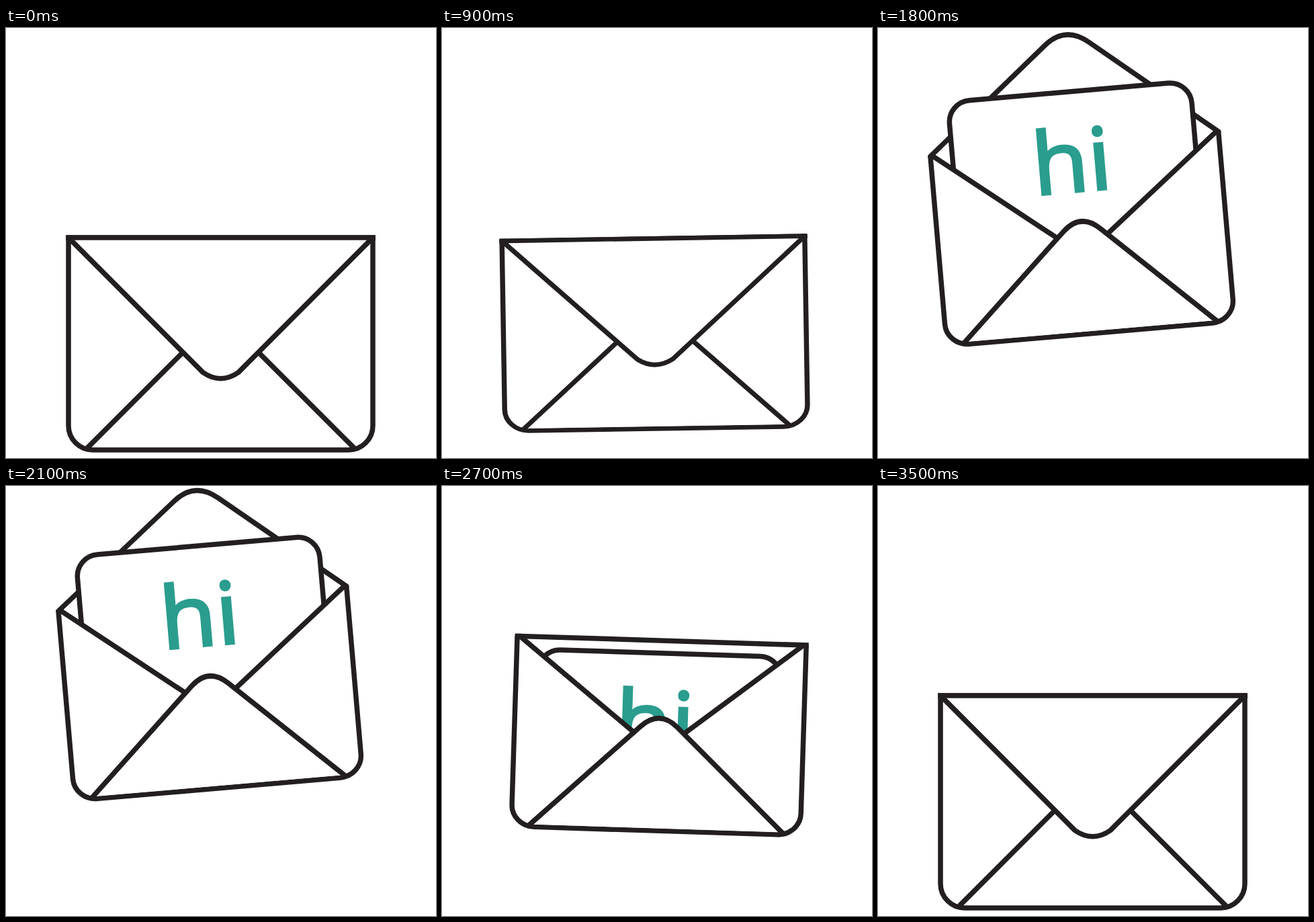
Animation of 640 by 640 pixels, one loop 4.4 s. Source, as an HTML page:

```html
<!DOCTYPE html>
<html lang="en">
<head>
<meta charset="utf-8">
<title>Envelope</title>
<style>
  html, body { margin: 0; width: 100%; height: 100%; overflow: hidden; background: #fff; }
  svg { display: block; width: 100vw; height: 100vh; }
  .ink { fill: #fff; stroke: #231f20; stroke-width: 7.5; stroke-linejoin: round; }
  .open .ink { vector-effect: non-scaling-stroke; }
  .round { stroke-linecap: round; }
  .word { font: 400 143px "Open Sans", "Noto Sans", sans-serif; fill: #2a9d8f; stroke: #2a9d8f; stroke-width: 4; }
  .spark { stroke: #000; stroke-width: 7; }
</style>
</head>
<body>
<svg viewBox="0 0 640 640">
  <g id="envelope">
    <path id="openFlap" class="ink round"/>
    <path id="rim" class="ink" d="M89.25 312H549.75"/>
    <g id="letter">
      <rect class="ink" x="127.3" y="312" width="381" height="250" rx="34" ry="36"/>
      <text class="word" x="251 338.5" y="478.5">hi</text>
    </g>
    <path class="ink" d="M93 314L97 312L285 469.5H354L542 312L546 314V592A36 36 0 0 1 510 628H129A36 36 0 0 1 93 592Z"/>
    <path class="ink round" d="M122 624L291 455Q319.5 427 348 455L517 624"/>
    <g id="front">
      <path id="shutFlap" class="ink round"/>
      <path class="ink" d="M89.25 312H549.75"/>
    </g>
  </g>
  <line id="sparkL" class="spark"/>
  <line id="sparkR" class="spark"/>
</svg>
<script>
const LOOP = 4400, STEP = 100;

const $ = id => document.getElementById(id);
const mix = (a, b, k) => a + (b - a) * k;

// Eased 0 to 1 between two times; a higher power is steeper in the middle.
function ramp(t, from, to, power = 2) {
  const k = Math.min(1, Math.max(0, (t - from) / (to - from)));
  const a = k ** power, b = (1 - k) ** power;
  return a / (a + b);
}

function pose(t) {
  const rise = ramp(t, 700, 1250, 2.6);
  const drift = ramp(t, 1200, 2400);
  const fall = ramp(t, 2400, 3100);
  const settle = ramp(t, 1400, 2100);
  const squash = ramp(t, 0, 700) - ramp(t, 2800, 3500);
  const narrow = ramp(t, 800, 1200) - ramp(t, 2700, 3100);
  return {
    y: 628 - 167 * rise - 12.5 * drift + 179.5 * fall,
    turn: -4.93 * rise + 7.5 * ramp(t, 2400, 2800) - 3.33 * ramp(t, 2800, 3100) + 0.76 * ramp(t, 3100, 3500),
    wide: 1 - 0.05 * narrow,
    tall: 1 - 0.104 * squash,
    flap: 1 - 1.886 * ramp(t, 900, 1350) + 0.029 * settle + 1.857 * ramp(t, 2400, 3024),
    lean: mix(-2, 3, settle),
    lift: -60 + 146 * ramp(t, 950, 1350) + 2 * settle - 148 * ramp(t, 2400, 2880),
    sparkOut: ramp(t, 1200, 1400),
    sparkIn: ramp(t, 1400, 1600)
  };
}

// k swings the flap from shut (1) to open (-1); half is the half-width of its round tip.
function flapPath(k, half, depth, lean) {
  const mid = 319.5 + lean;
  const side = 312 + (227 - half) * k;
  return `M93 312L${mid - half} ${side}Q${mid} ${312 + depth * k} ${mid + half} ${side}L546 312`;
}

function drawSpark(line, [x1, y1], [x2, y2], from, to) {
  const ends = { x1: mix(x1, x2, from), y1: mix(y1, y2, from), x2: mix(x1, x2, to), y2: mix(y1, y2, to) };
  for (const name in ends) line.setAttribute(name, ends[name]);
  show(line, to > from);
}

function show(el, on) { el.style.display = on ? "" : "none"; }

function draw(t) {
  const p = pose(t);
  const x = 319.5 + 35 * (p.wide - 1) + 0.22 * p.turn;
  $("envelope").setAttribute("transform",
    `translate(${x} ${p.y}) rotate(${p.turn}) scale(${p.wide} ${p.tall}) translate(-319.5 -628)`);
  $("letter").setAttribute("transform", `translate(0 ${-p.lift})`);

  const open = p.flap < 0.05;
  const raised = p.flap < -0.05;
  $("envelope").classList.toggle("open", open);
  $("openFlap").setAttribute("d", flapPath(p.flap, 35, 228, p.lean));
  $("shutFlap").setAttribute("d", flapPath(p.flap, 26.5, 219, 0));
  show($("openFlap"), raised);
  show($("rim"), !raised);
  show($("front"), !open);

  drawSpark($("sparkL"), [134, 105.5], [120.5, 84], p.sparkIn, p.sparkOut);
  drawSpark($("sparkR"), [422.5, 82], [430.5, 55], p.sparkIn, p.sparkOut);
}

const start = performance.now();
function tick(now) {
  const t = Math.max(0, now - start) % LOOP;
  draw(Math.floor(t / STEP) * STEP);
  requestAnimationFrame(tick);
}
draw(0);
requestAnimationFrame(tick);
</script>
</body>
</html>
```
